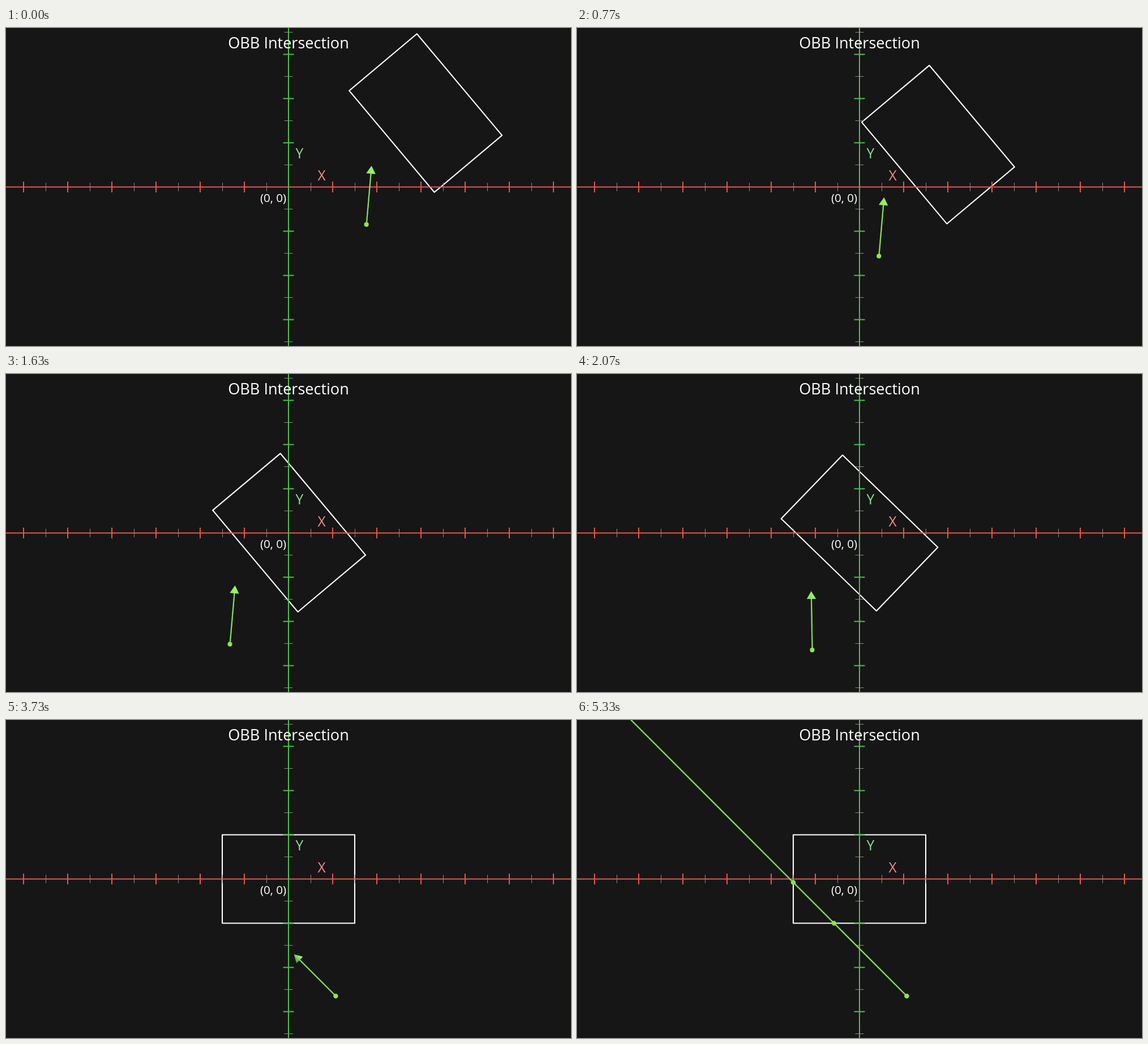
These frames come from a looping animation (998x561 px, 5.43 s). An HTML page:

```html
<!DOCTYPE html>
<html lang="en">
<head>
<meta charset="utf-8">
<title>OBB Intersection</title>
<style>
html, body { margin: 0; width: 100%; height: 100%; overflow: hidden; background: #161616; }
svg { display: block; width: 100%; height: 100%; }
text { font-family: "Open Sans", "Noto Sans", sans-serif; text-anchor: middle; fill: #fff; }
</style>
</head>
<body>
<svg viewBox="0 0 998 561">
  <defs>
    <linearGradient id="cone" gradientUnits="userSpaceOnUse" x1="-8" y1="0" x2="8" y2="0">
      <stop id="shade" offset="0"/>
      <stop offset="0.75" stop-color="#97f566"/>
    </linearGradient>
  </defs>
  <rect width="998" height="561" fill="#161616"/>
  <g class="move">
    <rect x="-117" y="-78" width="234" height="156" fill="none" stroke="#fff" stroke-width="2.1" stroke-linejoin="round"/>
  </g>
  <path id="minor" stroke="#8a8a8a" stroke-width="1"/>
  <path id="xAxis" stroke="#e9544c" stroke-width="2"/>
  <path id="yAxis" stroke="#4cc04c" stroke-width="2"/>
  <text x="499" y="35.5" font-size="27.1">OBB Intersection</text>
  <text x="472" y="306.5" font-size="20.6">(0, 0)</text>
  <text x="518.5" y="230" font-size="24.6" style="fill:#92e092">Y</text>
  <text x="557.5" y="269" font-size="24.6" style="fill:#f58b8b">X</text>
  <g class="move">
    <g transform="translate(83.4 206.5) rotate(-45)" fill="#8fe351">
      <path id="shaft" stroke="#78cc4a" stroke-width="2.2"/>
      <path id="light" stroke="#96e365" stroke-width="1.1"/>
      <path id="head" d="M0 0L8.2 14H-8.2Z" fill="url(#cone)"/>
      <circle r="4.1"/>
      <circle class="hit" r="4.1"/>
      <circle class="hit" r="4.1"/>
    </g>
  </g>
</svg>
<script>
const LOOP = 5430, FPS = 30, UNIT = 39, OX = 499, OY = 280.5;
const START = { x: 242.2, y: -130.5, angle: 50 };
const LENGTH = 104, GROWTH = 6;
// distances along the ray to the near and far box sides
const HITS = [128.5, 200.4].map(d => d * Math.SQRT2);

const $ = id => document.getElementById(id);
const moving = document.querySelectorAll(".move");
const hits = document.querySelectorAll(".hit");

function ease(t, from, span) {
  const p = Math.min(1, Math.max(0, (t - from) / span));
  return p * p * (3 - 2 * p);
}

function mix(a, b, k) {
  return "rgb(" + a.map((v, i) => Math.round(v + (b[i] - v) * k)).join(",") + ")";
}

function drawAxes() {
  let xs = `M0 ${OY}H998`, ys = `M${OX} 0V561`, minor = "";
  for (let i = -12; i <= 12; i++) {
    if (!i) continue;
    const x = OX + i * UNIT, y = OY + i * UNIT;
    const r = i % 2 ? 7.5 : 9.5;
    const tx = `M${x} ${OY - r}v${2 * r}`, ty = `M${OX - r} ${y}h${2 * r}`;
    if (i % 2) {
      minor += `M${x + 0.5} ${OY - r}v${2 * r}` + ty;
    } else {
      xs += tx;
      ys += ty;
    }
  }
  $("xAxis").setAttribute("d", xs);
  $("yAxis").setAttribute("d", ys);
  $("minor").setAttribute("d", minor);
}

function render(ms) {
  // motion advances in steps of 1/30 s
  const t = Math.floor((ms + 3.4) * FPS / 1000) / FPS;
  const away = 1 - ease(t, 0, 1.7);
  const turn = 1 - ease(t, 1.7, 1.7);
  const len = LENGTH * (1 + GROWTH * ease(t, 3.73, 1.74));

  const pose = `translate(${OX + START.x * away} ${OY + START.y * away}) rotate(${START.angle * turn})`;
  moving.forEach(g => g.setAttribute("transform", pose));

  $("shaft").setAttribute("d", `M0 0V${12 - len}`);
  $("light").setAttribute("d", `M0.5 0V${12 - len}`);
  $("head").setAttribute("transform", `translate(0 ${-len})`);
  $("shade").setAttribute("stop-color", mix([140, 236, 94], [76, 143, 51], 1 - turn));

  hits.forEach((dot, i) => {
    dot.setAttribute("cy", -HITS[i]);
    dot.setAttribute("visibility", len >= HITS[i] ? "visible" : "hidden");
  });
}

drawAxes();
const begin = performance.now();
function tick() {
  render((performance.now() - begin) % LOOP);
  requestAnimationFrame(tick);
}
tick();
</script>
</body>
</html>
```
